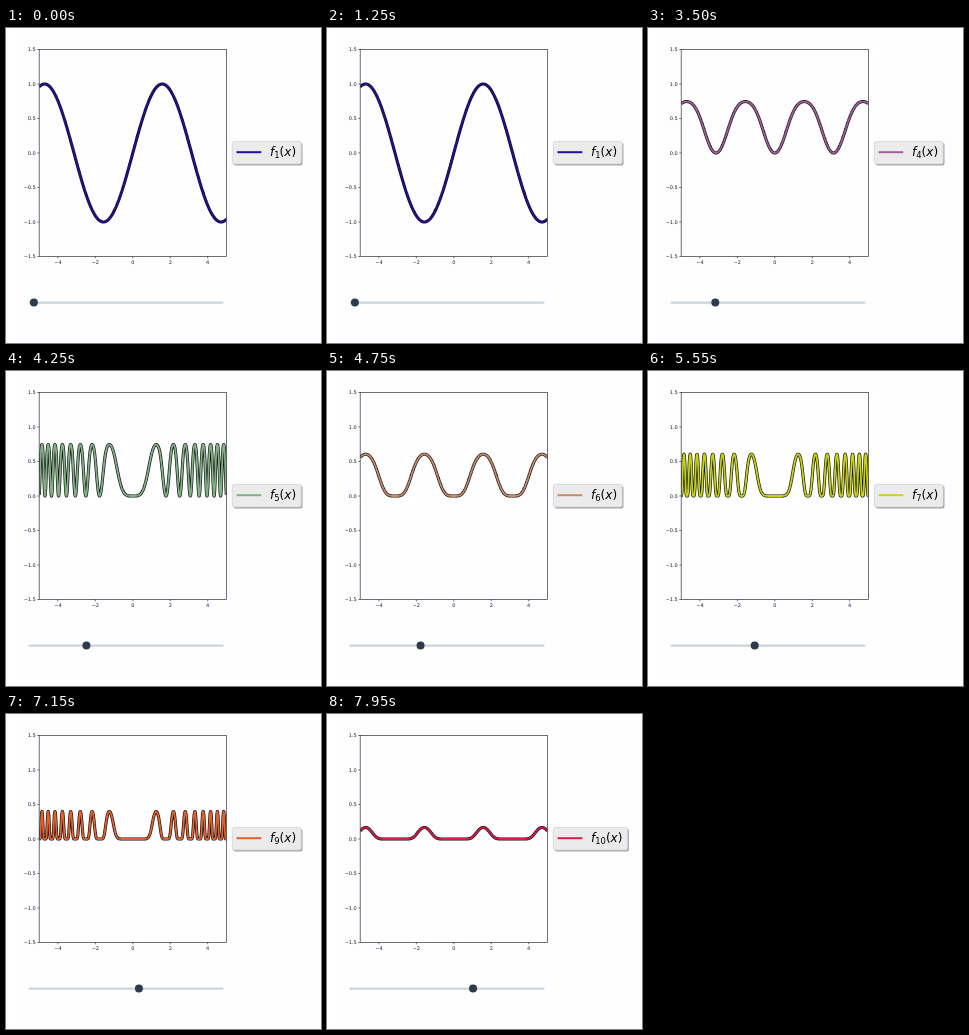
Animation, 315 px wide and 315 px high, one loop 8000 ms. Source, as an HTML page:

```html
<!DOCTYPE html>
<html lang="en">
<head>
<meta charset="utf-8">
<title>Composed sines</title>
<style>
  html, body { margin: 0; width: 100%; height: 100%; overflow: hidden; background: #fefdff; }
  svg { display: block; width: 100vw; height: 100vh; }
  text { font-family: "DejaVu Sans", sans-serif; fill: #1c1c1c; }
  .tick { font-size: 5px; }
  .label { font-size: 12px; fill: #000; }
  .it { font-style: italic; }
  .sub { font-size: 8.4px; }
  .curve { fill: none; stroke-linejoin: round; }
</style>
</head>
<body>
<svg viewBox="0 0 315 315">
  <defs><clipPath id="clip"><rect x="33.2" y="21.5" width="187.2" height="207"/></clipPath></defs>
  <g clip-path="url(#clip)">
    <path id="edge" class="curve" stroke="#111" stroke-width="3.1"/>
    <path id="core" class="curve" stroke-width="1.8"/>
  </g>
  <g id="axes" stroke="#333" stroke-width=".7" fill="none">
    <rect x="33.2" y="21.5" width="187.2" height="207"/>
  </g>
  <rect id="shadow" x="227.6" y="114.8" height="22.6" rx="2" fill="#a4a4a6"/>
  <rect id="box" x="226.3" y="113.4" height="22.6" rx="2" fill="#ebebec" stroke="#cfcfd1" stroke-width=".7"/>
  <path id="key" d="M230.5 124.2H255.3" stroke-width="2"/>
  <text class="label" x="264" y="128.2"><tspan class="it">f</tspan><tspan id="index" class="sub" dy="2">1</tspan><tspan dy="-2">(</tspan><tspan class="it">x</tspan><tspan>)</tspan></text>
  <path d="M23.5 274.6H216.5" stroke="#cdd4da" stroke-width="2.1" stroke-linecap="round"/>
  <circle id="knob" cy="274.6" r="4" fill="#2c3a4d"/>
</svg>
<script>
const LOOP = 8000, STEP = 800, LEAD = 750, SAMPLES = 1500;
const COLORS = ['#2a0b98', '#7a10a8', '#c412b4', '#a35f9a', '#82b185',
                '#c98a68', '#c9d40e', '#dfa01c', '#e2602c', '#d81c48'];
const $ = id => document.getElementById(id);
const px = x => 126.8 + 18.72 * x;
const py = y => 125 - 69 * y;

function add(parent, tag, attrs, text = '') {
  const el = document.createElementNS('http://www.w3.org/2000/svg', tag);
  for (const k in attrs) el.setAttribute(k, attrs[k]);
  el.textContent = text;
  return parent.appendChild(el);
}

function drawTicks() {
  const axes = $('axes'), svg = axes.parentNode;
  const num = (v, d) => v.toFixed(d).replace('-', '\u2212');
  for (let x = -4; x <= 4; x += 2) {
    add(axes, 'path', { d: `M${px(x)} 228.5v1.8` });
    add(svg, 'text', { class: 'tick', x: px(x), y: 235.6, 'text-anchor': 'middle' }, num(x, 0));
  }
  for (let y = -1.5; y <= 1.5; y += .5) {
    add(axes, 'path', { d: `M33.2 ${py(y)}h-1.8` });
    add(svg, 'text', { class: 'tick', x: 29.8, y: py(y) + 1.8, 'text-anchor': 'end' }, num(y, 1));
  }
}

// f1 = sin; even n feeds sin x into the previous function, odd n feeds x².
function f(n, x) {
  for (; n > 1; n--) x = n % 2 ? x * x : Math.sin(x);
  return Math.sin(x);
}

function curve(n) {
  let d = '';
  for (let i = 0; i <= SAMPLES; i++) {
    const x = -5 + 10 * i / SAMPLES;
    d += (i ? 'L' : 'M') + px(x).toFixed(2) + ' ' + py(f(n, x)).toFixed(2);
  }
  return d;
}

let shown = 0;
function render(t) {
  const n = 1 + Math.max(0, Math.floor((t - LEAD) / STEP));
  if (n === shown) return;
  shown = n;
  const d = curve(n), width = n > 9 ? 74.2 : 68.9;
  $('edge').setAttribute('d', d);
  $('core').setAttribute('d', d);
  for (const id of ['core', 'key']) $(id).setAttribute('stroke', COLORS[n - 1]);
  for (const id of ['box', 'shadow']) $(id).setAttribute('width', width);
  $('index').textContent = n;
  $('knob').setAttribute('cx', 27.9 + 13.13 * (n - 1));
}

function tick() {
  render(performance.now() % LOOP);
  requestAnimationFrame(tick);
}
drawTicks();
tick();
</script>
</body>
</html>
```
